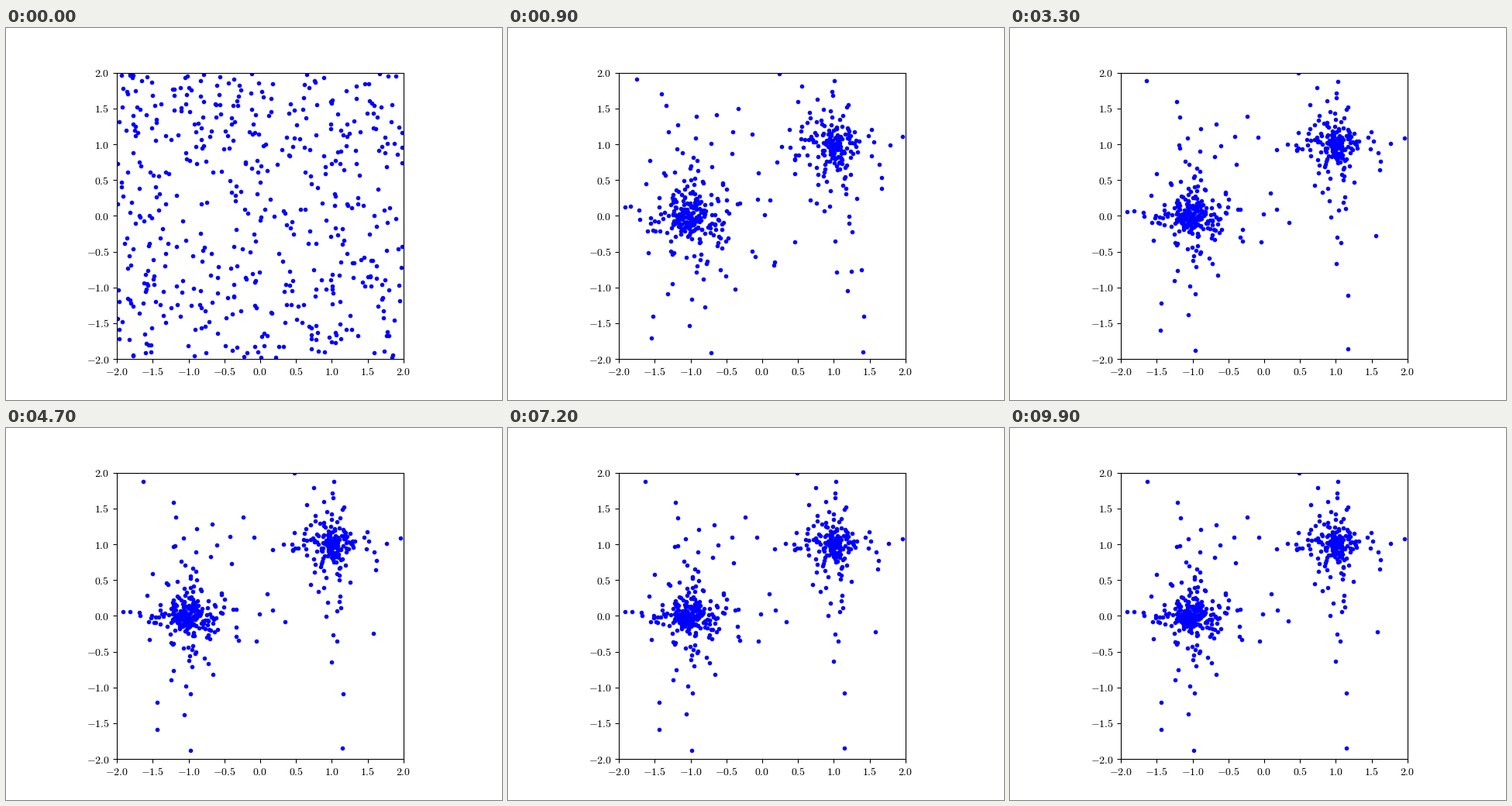
A matplotlib script for the animation above (10000 ms loop, 640 by 480 pixels).

```python
import numpy as np
import matplotlib.pyplot as plt
from matplotlib.animation import FuncAnimation

plt.rcParams["mathtext.fontset"] = "cm"

COUNT, FRAMES, INTERVAL = 500, 100, 100
SCALE = 0.11
CENTRES = ((-1, 0), (1, 1))


def heavy_tail(q):
    """Cauchy quantile for q in 0..1, slightly truncated."""
    return SCALE * np.tan(np.pi * 0.98 * (q - 0.5))


def rank(v):
    return (np.argsort(np.argsort(v)) + 0.5) / len(v)


rng = np.random.default_rng(12)
start = rng.uniform(-2, 2, (COUNT, 2))
end = np.empty_like(start)
reach = np.empty(COUNT)

# each side of a slanted line is squeezed into a heavy-tailed cluster
x, y = start.T
split = (0.5 - y) / 2
sides = ((x < split, (x + 2) / (split + 2)),
         (x >= split, (x - split) / (2 - split)))
for centre, (side, q) in zip(CENTRES, sides):
    offset = heavy_tail(np.column_stack((q[side], rank(y[side]))))
    end[side] = centre + offset
    reach[side] = np.hypot(*offset.T)

# the core settles quickly, the tails lag behind
tau = 0.2 + 0.35 * np.minimum(reach, 2)


def positions(t):
    rest = 0.97 * np.exp(-t / tau) + 0.03 * np.exp(-t / 3)
    return end + (start - end) * rest[:, None]


fig, ax = plt.subplots(figsize=(6.4, 4.8), dpi=100)
ax.set_aspect("equal")
ax.set(xlim=(-2, 2), ylim=(-2, 2))
ticks = np.linspace(-2, 2, 9)
labels = [f"${v:.1f}$" for v in ticks]
ax.set_xticks(ticks, labels)
ax.set_yticks(ticks, labels)
dots, = ax.plot([], [], "b.")


def update(frame):
    dots.set_data(*positions(frame * INTERVAL / 1000).T)
    return dots,


anim = FuncAnimation(fig, update, frames=FRAMES, interval=INTERVAL,
                     repeat=True, repeat_delay=0)
plt.show()
```
